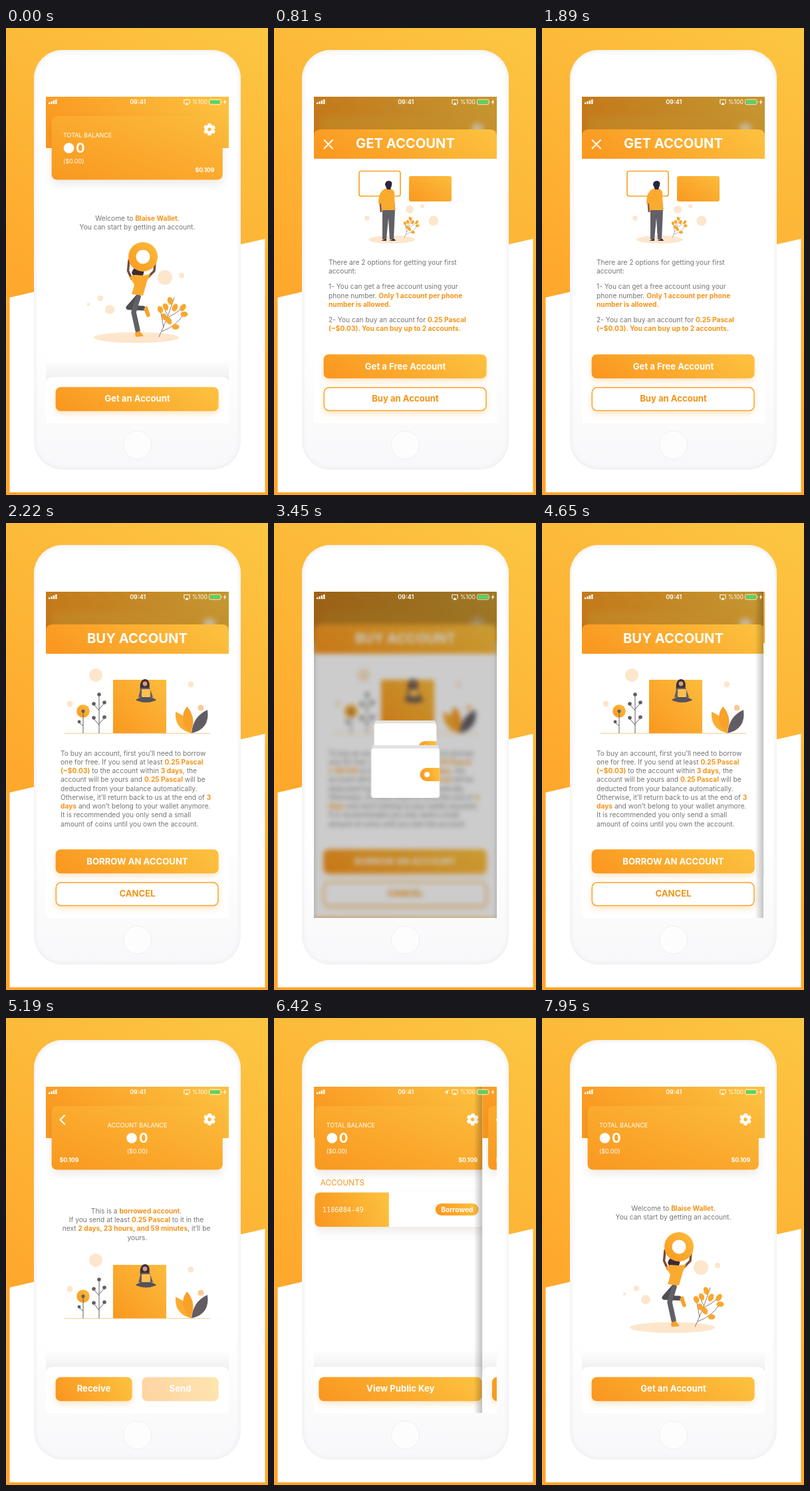
Animation, 394 px wide and 700 px high, one loop 7.98 s. Source, as an HTML page:

```html
<!DOCTYPE html>
<html lang="en">
<head>
<meta charset="utf-8">
<title>Wallet app</title>
<style>
html, body { margin: 0; width: 100%; height: 100%; overflow: hidden; background: #fff; }
svg { display: block; width: 100vw; height: 100vh; }
text { font-family: Inter, "Open Sans", sans-serif; }
.w { fill: #fff; }
.body { font-size: 10.2px; fill: #757575; }
.b { font-weight: 700; fill: #f2941a; }
.mid { text-anchor: middle; }
.end { text-anchor: end; }
.cap { font-size: 9px; }
.big { font-size: 20.2px; font-weight: 700; }
.btn { font-size: 13.1px; font-weight: 700; text-anchor: middle; }
.price { font-size: 8.8px; font-weight: 700; }
.glow { filter: drop-shadow(0 4px 5px rgba(250, 160, 50, .28)); }
.lift { filter: drop-shadow(0 7px 7px rgba(90, 70, 50, .11)); }

/* One shared 7.98 s clock */
.t { animation: 7980ms linear infinite both; }
.haze { animation-name: haze; }
.dim { animation-name: dim; }
.get { animation-name: get; }
.buy { animation-name: buy; }
.soft { animation-name: soft; }
.load { animation-name: load; }
.page { animation-name: page; }
.list { animation-name: list; }
.slide { animation-name: slide; }
.gps { animation-name: gps; }
.wallet { animation-name: wallet; animation-delay: calc(-5240ms + var(--i) * 480ms); }

@keyframes haze {
  0%, 3.76% { filter: blur(0); }
  8.02%, 63.53% { filter: blur(4px); }
  63.54%, 100% { filter: blur(0); }
}
@keyframes dim {
  0%, 3.76% { opacity: 0; }
  8.02%, 63.53% { opacity: .22; }
  63.54%, 100% { opacity: 0; }
}
@keyframes get {
  0%, 3.76% { transform: translateY(440px); animation-timing-function: cubic-bezier(.2, .7, .3, 1); }
  8.02%, 27.82% { transform: none; }
  27.83%, 100% { transform: translateY(440px); }
}
@keyframes buy {
  0%, 23.9% { transform: translateY(440px); animation-timing-function: cubic-bezier(.2, .7, .3, 1); }
  27.7%, 63.53% { transform: none; }
  63.54%, 100% { transform: translateY(440px); }
}
@keyframes soft {
  0%, 34.21% { filter: blur(0); }
  36.09%, 56.77% { filter: blur(3.6px); }
  58.27%, 100% { filter: blur(0); }
}
@keyframes load {
  0%, 34.21% { opacity: 0; }
  36.09%, 56.77% { opacity: 1; }
  58.27%, 100% { opacity: 0; }
}
@keyframes page {
  0%, 58.26% { transform: translateX(275px); opacity: 0; }
  58.27% { transform: translateX(275px); opacity: 1; animation-timing-function: cubic-bezier(.35, .91, .33, .97); }
  63.53% { transform: none; opacity: 1; }
  77.82% { transform: none; opacity: 1; animation-timing-function: cubic-bezier(.35, .91, .33, .97); }
  83.08% { transform: translateX(275px); opacity: 1; }
  83.09%, 100% { transform: translateX(275px); opacity: 0; }
}
@keyframes list {
  0%, 63.53% { opacity: 0; }
  63.54%, 97.37% { opacity: 1; }
  99.4%, 100% { opacity: 0; }
}
@keyframes slide {
  0%, 77.82% { transform: translateX(-91.7px); animation-timing-function: cubic-bezier(.35, .91, .33, .97); }
  83.08%, 100% { transform: none; }
}
@keyframes gps {
  0%, 77.06% { opacity: 0; }
  77.07%, 97.7% { opacity: 1; }
  97.71%, 100% { opacity: 0; }
}
@keyframes wallet {
  0% { transform: translate(197.5px, 390px) scale(1.1); opacity: 0; animation-timing-function: ease-out; }
  2.76% { transform: translate(197.5px, 333px) scale(1); opacity: 1; }
  6.02% { transform: translate(197.5px, 333px) scale(1); opacity: 1; animation-timing-function: ease-out; }
  8.78% { transform: translate(197.5px, 296px) scale(.91); opacity: 1; }
  12.03% { transform: translate(197.5px, 296px) scale(.91); opacity: 1; animation-timing-function: ease-out; }
  14.79% { transform: translate(197.5px, 264px) scale(.81); opacity: 1; }
  18.05% { transform: translate(197.5px, 264px) scale(.81); opacity: 1; animation-timing-function: ease-out; }
  20.8%, 100% { transform: translate(197.5px, 236px) scale(.7); opacity: 0; }
}
</style>
</head>
<body>
<svg viewBox="0 0 394 700">
<defs>
  <linearGradient id="bg" gradientUnits="userSpaceOnUse" x1="394" y1="0" x2="40" y2="600">
    <stop stop-color="#fcc642"/><stop offset=".75" stop-color="#fea82c"/><stop offset="1" stop-color="#fea52b"/>
  </linearGradient>
  <linearGradient id="or" x1="0" y1=".6" x2="1" y2=".4">
    <stop stop-color="#fa9820"/><stop offset="1" stop-color="#fcc03e"/>
  </linearGradient>
  <linearGradient id="card" x1="0" y1="1" x2="1" y2="0">
    <stop stop-color="#f9981f"/><stop offset="1" stop-color="#fcbc3c"/>
  </linearGradient>
  <linearGradient id="shell" x1="0" y1="0" x2="0" y2="1">
    <stop offset=".7" stop-color="#fff"/><stop offset="1" stop-color="#f8f8fa"/>
  </linearGradient>
  <linearGradient id="rise" x1="0" y1="0" x2="0" y2="1">
    <stop stop-opacity="0"/><stop offset="1" stop-opacity=".075"/>
  </linearGradient>
  <linearGradient id="edge"><stop stop-opacity="0"/><stop offset="1" stop-opacity=".24"/></linearGradient>
  <clipPath id="screen"><rect x="60" y="103" width="275" height="489"/></clipPath>
  <clipPath id="case"><rect x="42" y="33" width="311" height="629" rx="43"/></clipPath>

  <g id="gear" fill="none" stroke="#fff">
    <circle r="5" stroke-width="4.6"/>
    <circle r="7.7" stroke-width="2.8" stroke-dasharray="5 3.06" stroke-dashoffset="2.5" transform="rotate(30)"/>
  </g>
  <g id="head">
    <rect x="60" y="103" width="275" height="77" fill="url(#or)"/>
    <rect class="lift" x="68.6" y="132" width="257.2" height="95.5" rx="8" fill="url(#card)"/>
    <use href="#gear" x="306" y="152"/>
  </g>
  <g id="total">
    <use href="#head"/>
    <g class="w">
      <text class="cap" x="86" y="163.5">TOTAL BALANCE</text>
      <circle cx="94.5" cy="180" r="7.8"/>
      <text class="big" x="105" y="187">0</text>
      <text class="cap" x="86" y="203">($0.00)</text>
      <text class="price end" x="313.5" y="216">$0.109</text>
    </g>
  </g>
  <g id="panel">
    <rect x="60" y="497" width="275" height="36" fill="url(#rise)"/>
    <path class="w" d="M60 592V533q0-10 10-10H325q10 0 10 10V592Z"/>
  </g>
  <rect id="wide" class="glow" x="74.6" y=".3" width="245" height="36" rx="7.5" fill="url(#or)"/>
  <rect id="line" x="75.3" y="538.9" width="243.7" height="34.7" rx="7.5" fill="#fff" stroke="#f8a42a" stroke-width="1.5"/>
  <g id="sheet">
    <rect class="w" x="60" y="180" width="275" height="412"/>
    <path d="M60 196V162q0-10 10-10H325q10 0 10 10V196Z" fill="url(#or)"/>
    <use href="#wide" y="489"/>
    <use href="#line" class="glow"/>
  </g>

  <g id="sprig">
    <path d="M0 0Q12-25 23-59M4-8Q26-16 37-34M7-14Q4-30 2-41M13-29Q24-34 35-43M14-32Q8-38 10-45" fill="none" stroke="#6a5a50" stroke-width=".8"/>
    <g fill="#f9a72e">
      <ellipse cx="17" cy="-54" rx="4" ry="6" transform="rotate(-20 17 -54)"/>
      <ellipse cx="24" cy="-44" rx="4" ry="6" transform="rotate(25 24 -44)"/>
      <ellipse cx="10" cy="-45" rx="4" ry="5.5" transform="rotate(-25 10 -45)"/>
      <ellipse cx="36" cy="-44" rx="4" ry="6" transform="rotate(35 36 -44)"/>
      <ellipse cx="2" cy="-41" rx="4" ry="5.5" transform="rotate(-20 2 -41)"/>
      <ellipse cx="8" cy="-30" rx="4" ry="5.5" transform="rotate(-30 8 -30)"/>
      <ellipse cx="38" cy="-34" rx="5.5" ry="4"/>
      <ellipse cx="15" cy="-24" rx="4" ry="5.5" transform="rotate(-25 15 -24)"/>
      <ellipse cx="25" cy="-15" rx="5.5" ry="4"/>
    </g>
  </g>

  <g id="jump">
    <g fill="#fde6cc">
      <ellipse cx="196" cy="464" rx="64" ry="8"/>
      <circle cx="239" cy="374" r="11"/><circle cx="156" cy="422" r="7"/>
      <circle cx="142" cy="405" r="4.3"/><circle cx="124" cy="414" r="2.3"/><circle cx="264" cy="371" r="4"/>
    </g>
    <use href="#sprig" x="230" y="463"/>
    <g fill="none" stroke-linecap="round" stroke-linejoin="round">
      <path d="M189 376L183.5 364L185 348M211 376L223 364L224 352" stroke="#7b4a35" stroke-width="3.4"/>
      <path d="M198 403L184 419L206 420" stroke="#504e55" stroke-width="7"/>
      <path d="M199 403L192 426L198 453" stroke="#626067" stroke-width="7.5"/>
    </g>
    <path d="M189 367Q191 357 203 359Q211 366 204 373Q192 376 189 367Z" fill="#3b2b33"/>
    <path d="M186 373L193 370L207 371L217 369L212 380L206 401L189 399L193 385Z" fill="#fbaa30"/>
    <path d="M207 421l5-5 5 15q-4 5-6 0ZM194 457l7-3 6 8-12 1Z" fill="#f9a22a"/>
    <circle cx="206" cy="343" r="22" fill="url(#card)"/>
    <circle class="w" cx="206" cy="343" r="10.5"/>
  </g>

  <g id="choose">
    <g fill="#fde6cc">
      <ellipse cx="177" cy="317" rx="35" ry="6"/>
      <circle cx="240" cy="289" r="7.5"/><circle cx="204" cy="272" r="6"/>
      <circle cx="223" cy="267" r="3"/><circle cx="140" cy="285" r="3.8"/>
    </g>
    <rect x="128" y="214.5" width="62" height="37.5" rx="3" fill="#fff" stroke="#f8a42a" stroke-width="1.7"/>
    <rect x="203" y="222" width="64" height="38" rx="3" fill="url(#card)"/>
    <use href="#sprig" transform="translate(196 314) scale(.52)"/>
    <path d="M163 272H182L180 317H174L172 285L169 317H163Z" fill="#626067"/>
    <path d="M161 319l8-3v3ZM173 319l8-3 2 3Z" fill="#2b2738"/>
    <path d="M160 262L161 276M180 262L181 273" stroke="#8a5a45" stroke-width="3"/>
    <path d="M167 241Q178 239 181 246L182 273H162L161 263H157Q157 245 167 241Z" fill="#fbaa30"/>
    <path d="M167 235q0-6 6-6 6 1 4 7l-2 6h-5Z" fill="#2b2440"/>
  </g>

  <g id="garden">
    <path d="M88 315.3H307" stroke="#fbd2a2" stroke-width="1.2"/>
    <g fill="#fde6cc">
      <circle cx="135" cy="228" r="10"/><circle cx="96" cy="271" r="4.5"/><circle cx="278" cy="242" r="4.5"/>
    </g>
    <circle cx="293" cy="277" r="4.5" fill="#fcca92"/>
    <circle cx="116" cy="282" r="9.8" fill="url(#card)"/>
    <g fill="none" stroke="#625d63" stroke-width="1">
      <path d="M116 282V315M116 304l-6-5M140 258V315M140 281l-8-9M140 279l8-9M140 303l-8-10M140 301l8-9"/>
    </g>
    <g fill="#625d63">
      <circle cx="116" cy="282" r="2.6"/><circle cx="110" cy="298" r="2.4"/>
      <circle cx="140" cy="257" r="2.8"/><circle cx="132" cy="271" r="2.8"/><circle cx="148" cy="269" r="2.8"/>
      <circle cx="132" cy="292" r="2.8"/><circle cx="148" cy="291" r="2.8"/>
    </g>
    <rect x="161" y="235" width="80" height="80" fill="url(#card)"/>
    <path d="M202 251q-2-17 8-17 8 2 5 16l5 10h-20Z" fill="#39313f"/>
    <circle cx="209" cy="241" r="3.4" fill="#d89b7c"/>
    <path d="M203 247h13l5 14h-22Z" fill="#625f68"/>
    <path d="M198 265q12-8 25 0-12 5-25 0Z" fill="#55525c" stroke="#55525c" stroke-width="3"/>
    <rect x="204" y="249" width="13" height="12" rx="1" fill="#ffbf50"/>
    <path d="M279 315Q307 309 303 280Q281 290 279 315Z" fill="#625d63"/>
    <path d="M279 315Q253 309 255 283Q278 292 279 315Z" fill="#fbad33"/>
    <path d="M277 315Q258 294 272 275Q288 293 277 315Z" fill="#f9a128"/>
  </g>

  <g id="purse">
    <rect x="-50.5" width="101" height="30" rx="4" fill="#e2e2e2"/>
    <rect class="w" x="-51.5" y="5" width="103" height="74" rx="4"/>
    <path d="M51.5 34H32a10 10 0 0 0 0 20H51.5Z" fill="url(#or)"/>
    <circle class="w" cx="32.5" cy="44" r="4"/>
  </g>
</defs>

<rect width="394" height="700" fill="url(#bg)"/>
<path class="w" d="M5.5 404L389.5 316V696H5.5Z"/>

<rect x="42" y="33" width="311" height="629" rx="43" fill="url(#shell)"/>
<g clip-path="url(#case)">
  <rect x="42" y="33" width="311" height="629" rx="43" fill="none" stroke="#efeff3" stroke-width="5" style="filter: blur(2.5px)"/>
</g>
<circle cx="197.5" cy="625" r="21" fill="#fdfdfe" stroke="#efeff2"/>

<g clip-path="url(#screen)">
  <g class="t soft">
    <rect class="w" x="40" y="83" width="315" height="529"/>

    <!-- Empty home -->
    <g class="t haze">
      <rect x="40" y="83" width="315" height="97" fill="url(#or)"/>
      <use href="#total"/>
      <text class="body mid" x="197.5" y="288.5">Welcome to <tspan class="b">Blaise Wallet</tspan>.</text>
      <text class="body mid" x="197.5" y="301.5">You can start by getting an account.</text>
      <use href="#jump"/>
      <use href="#panel"/>
      <use href="#wide" y="538"/>
      <text class="btn w" x="197.5" y="560">Get an Account</text>
    </g>

    <!-- Home with accounts -->
    <g class="t list"><g class="t slide">
      <rect class="w" x="60" y="103" width="275" height="489"/>
      <use href="#total"/>
      <text x="77" y="250.5" font-size="11.7" fill="#f2941a">ACCOUNTS</text>
      <rect class="w lift" x="68.6" y="261.5" width="257.2" height="51.5" rx="8"/>
      <path d="M180 261.5H76.6q-8 0-8 8V305q0 8 8 8H180Z" fill="url(#or)"/>
      <text class="w" x="80" y="291" font-size="10.3" style="font-family: 'Noto Sans Mono', 'DejaVu Sans Mono', monospace">1186084-49</text>
      <rect x="250" y="278" width="65" height="18" rx="9" fill="url(#or)"/>
      <text class="w mid" x="282.5" y="290.5" font-size="10.2" font-weight="700">Borrowed</text>
      <use href="#panel"/>
      <use href="#wide" y="538"/>
      <text class="btn w" x="197.5" y="560">View Public Key</text>
    </g></g>

    <rect class="t dim" x="40" y="83" width="315" height="529"/>

    <g class="t get">
      <use href="#sheet"/>
      <path d="M75.5 168l12.5 12.5M88 168L75.5 180.5" stroke="#fff" stroke-width="1.8" stroke-linecap="round"/>
      <text class="big w mid" x="197.5" y="180">GET ACCOUNT</text>
      <use href="#choose"/>
      <text class="body" y="354.5">
        <tspan x="82">There are 2 options for getting your first</tspan>
        <tspan x="82" dy="13.2">account:</tspan>
        <tspan x="82" dy="23.6">1- You can get a free account using your</tspan>
        <tspan x="82" dy="13.2">phone number. <tspan class="b">Only 1 account per phone</tspan></tspan>
        <tspan x="82" dy="13.2" class="b">number is allowed.</tspan>
        <tspan x="82" dy="23.4">2- You can buy an account for <tspan class="b">0.25 Pascal</tspan></tspan>
        <tspan x="82" dy="13.2" class="b">(~$0.03). You can buy up to 2 accounts.</tspan>
      </text>
      <text class="btn w" x="197.5" y="511.5">Get a Free Account</text>
      <text class="btn b" x="197.5" y="560">Buy an Account</text>
    </g>

    <g class="t buy">
      <use href="#sheet"/>
      <text class="big w mid" x="197.5" y="180">BUY ACCOUNT</text>
      <use href="#garden"/>
      <text class="body" y="348.5">
        <tspan x="82">To buy an account, first you’ll need to borrow</tspan>
        <tspan x="82" dy="13.25">one for free. If you send at least <tspan class="b">0.25 Pascal</tspan></tspan>
        <tspan x="82" dy="13.25"><tspan class="b">(~$0.03)</tspan> to the account within <tspan class="b">3 days</tspan>, the</tspan>
        <tspan x="82" dy="13.25">account will be yours and <tspan class="b">0.25 Pascal</tspan> will be</tspan>
        <tspan x="82" dy="13.25">deducted from your balance automatically.</tspan>
        <tspan x="82" dy="13.25">Otherwise, it’ll return back to us at the end of <tspan class="b">3</tspan></tspan>
        <tspan x="82" dy="13.25"><tspan class="b">days</tspan> and won’t belong to your wallet anymore.</tspan>
        <tspan x="82" dy="13.25">It is recommended you only send a small</tspan>
        <tspan x="82" dy="13.25">amount of coins until you own the account.</tspan>
      </text>
      <text class="btn w" x="197.5" y="511.5">BORROW AN ACCOUNT</text>
      <text class="btn b" x="197.5" y="560">CANCEL</text>
    </g>
  </g>

  <!-- Loading -->
  <g class="t load">
    <rect x="60" y="103" width="275" height="489" opacity=".2"/>
    <g class="t wallet" style="--i: 0"><use href="#purse"/></g>
    <g class="t wallet" style="--i: 1"><use href="#purse"/></g>
    <g class="t wallet" style="--i: 2"><use href="#purse"/></g>
    <g class="t wallet" style="--i: 3"><use href="#purse"/></g>
  </g>

  <!-- Account page -->
  <g class="t page">
    <rect x="47" y="103" width="13" height="489" fill="url(#edge)"/>
    <rect class="w" x="60" y="103" width="275" height="489"/>
    <use href="#head"/>
    <path d="M88 146l-6.5 6.5 6.5 6.5" fill="none" stroke="#fff" stroke-width="2.2" stroke-linecap="round" stroke-linejoin="round"/>
    <g class="w">
      <text class="cap mid" x="197.5" y="163.5">ACCOUNT BALANCE</text>
      <circle cx="189" cy="180" r="7.8"/>
      <text class="big" x="200" y="187">0</text>
      <text class="cap mid" x="197.5" y="203">($0.00)</text>
      <text class="price" x="80.5" y="216">$0.109</text>
    </g>
    <text class="body mid" y="293">
      <tspan x="197.5">This is a <tspan class="b">borrowed account</tspan>.</tspan>
      <tspan x="197.5" dy="13.2">If you send at least <tspan class="b">0.25 Pascal</tspan> to it in the</tspan>
      <tspan x="197.5" dy="13.2">next <tspan class="b">2 days, 23 hours, and 59 minutes</tspan>, it’ll be</tspan>
      <tspan x="197.5" dy="13.2">yours.</tspan>
    </text>
    <use href="#garden" y="135"/>
    <use href="#panel"/>
    <rect class="glow" x="74.6" y="538.3" width="115" height="36" rx="7.5" fill="url(#or)"/>
    <rect x="204.6" y="538.3" width="115" height="36" rx="7.5" fill="url(#or)" opacity=".42"/>
    <text class="btn w" x="132" y="560">Receive</text>
    <text class="btn w" x="262" y="560">Send</text>
  </g>

  <!-- Status bar -->
  <g class="w">
    <path d="M64 111.5h2.3v2.5H64ZM67.4 110h2.3v4h-2.3ZM70.8 108.5h2.3v5.5h-2.3ZM74.2 107h2.3v7h-2.3Z"/>
    <text class="mid" x="198.3" y="114" font-size="9.1" font-weight="600">09:41</text>
    <path class="t gps" d="M256 111.5l7-4-3.2 7.5-.7-3.2Z"/>
    <path d="M269 113h-1.2V107.6h8.4V113H275" fill="none" stroke="#fff" stroke-width="1"/>
    <path d="M272 111.5l3 3.8h-6Z"/>
    <text x="280" y="114" font-size="8.7">%100</text>
    <rect x="305.5" y="107.2" width="17.5" height="7.6" rx="2" fill="none" stroke="#fff" stroke-width=".8"/>
    <rect x="306.8" y="108.4" width="15" height="5.2" rx="1" fill="#4cd964"/>
    <path d="M324 109.5q1.3 1.5 0 3ZM330 107l-3.2 4.4h2l-.8 3.6 3.4-4.6h-2Z"/>
  </g>
</g>
</svg>
</body>
</html>
```
